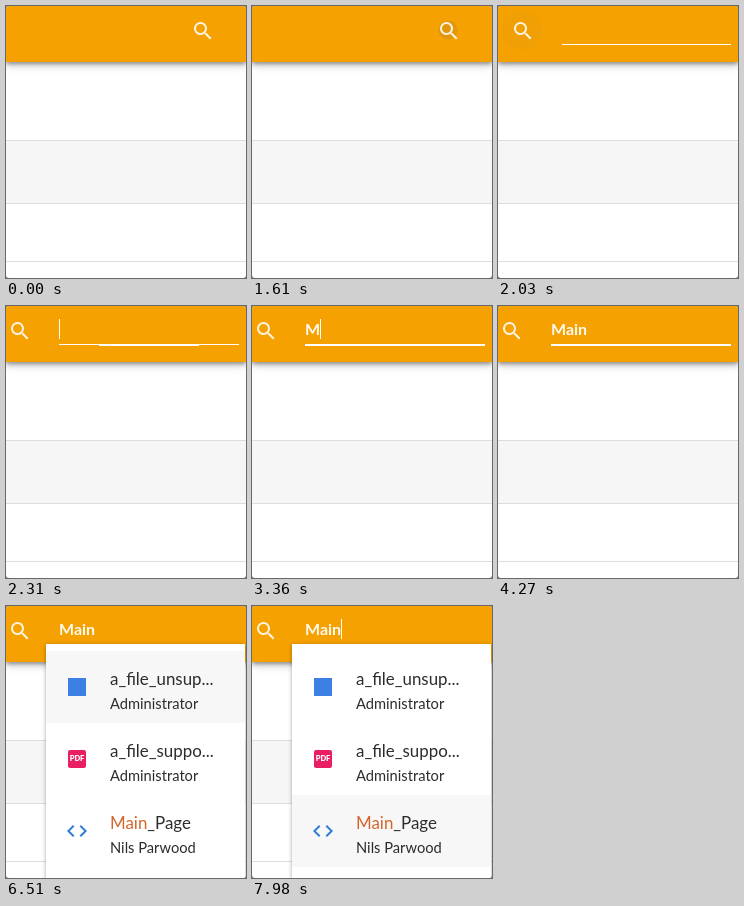
An HTML page for the animation above (8 s loop, 240 px wide and 272 px high).

```html
<!DOCTYPE html>
<html lang="en">
<head>
<meta charset="utf-8">
<title>Search</title>
<style>
html, body { margin: 0; width: 100%; height: 100%; overflow: hidden; background: #777; }
div, svg, b { position: absolute; }
#stage { width: 240px; height: 272px; overflow: hidden; border-radius: 3px; background: #fff; font-family: Lato, sans-serif; }
.line { width: 240px; height: 1px; background: #dedede; }
#band { top: 135px; width: 240px; height: 62px; background: #f6f6f6; }
#bar { width: 240px; height: 56px; background: #f5a102; box-shadow: 0 2px 4px rgba(0,0,0,.35), 0 3px 9px rgba(0,0,0,.2); }
#ripple { top: 4px; width: 40px; height: 40px; border-radius: 50%; background: #4a4a4a; }
#glass { top: 12.5px; fill: #fff; opacity: .87; }
#under { top: 38px; height: 1px; background: #fff; }
#focus { left: 53px; top: 38px; width: 180px; height: 2px; background: #fff; }
#query { left: 53px; top: 13px; color: #fffaf0; font-size: 16px; line-height: 20px; }
#caret { left: 100%; top: 0; width: 1px; height: 20px; background: #fff; }
#menu { left: 40px; top: 38px; width: 199px; height: 250px; background: #fff; box-shadow: 0 1px 4px rgba(0,0,0,.35); }
.item { width: 199px; height: 72px; color: #2c2c2c; white-space: nowrap; }
.title { left: 64px; top: 16px; font-size: 16.9px; line-height: 24px; }
.title span { color: #d4652a; }
.by { left: 64px; top: 43px; font-size: 14.7px; line-height: 18px; }
.square { left: 22px; top: 27px; width: 18px; height: 18px; }
#doc { background: #3d80e3; }
#pdf { border-radius: 2px; background: #e91e63; color: #fff; font: 900 7.5px/18px Lato, sans-serif; text-align: center; }
#code { left: 19px; top: 24px; fill: #2f7bd9; }
</style>
</head>
<body>
<div id="stage">
  <div id="band"></div>
  <div class="line" style="top:134px"></div>
  <div class="line" style="top:197px"></div>
  <div class="line" style="top:255px"></div>
  <div id="bar">
    <div id="ripple"></div>
    <svg id="glass" width="24" height="24"><path d="M15.5 14h-.79l-.28-.27A6.5 6.5 0 1 0 13.73 14.43l.27.28v.79l5 4.99L20.49 19zM9.5 14a4.5 4.5 0 1 1 0-9 4.5 4.5 0 0 1 0 9z"/></svg>
    <div id="under"></div>
    <div id="focus"></div>
    <b id="query"><span id="text"></span><div id="caret"></div></b>
  </div>
  <div id="menu">
    <div class="item" style="top:7px">
      <div class="square" id="doc"></div>
      <div class="title">a_file_unsup...</div><div class="by">Administrator</div>
    </div>
    <div class="item" style="top:79px">
      <div class="square" id="pdf">PDF</div>
      <div class="title">a_file_suppo...</div><div class="by">Administrator</div>
    </div>
    <div class="item" style="top:151px">
      <svg id="code" width="24" height="24"><path d="M9.4 16.6L4.8 12l4.6-4.6L8 6l-6 6 6 6zM14.6 16.6l4.6-4.6-4.6-4.6L16 6l6 6-6 6z"/></svg>
      <div class="title"><span>Main</span>_Page</div><div class="by">Nils Parwood</div>
    </div>
  </div>
</div>
<script>
const LOOP = 8000, STEP = 70;
const $ = id => document.getElementById(id);
const items = document.querySelectorAll('.item');
const clamp = v => Math.max(0, Math.min(1, v));
const ramp = (t, from, length) => clamp((t - from) / length);

// Cubic Bezier easing, solved by bisection
const ease = (x1, y1, x2, y2) => x => {
  const at = (a, b, s) => 3 * a * s * (1 - s) ** 2 + 3 * b * s * s * (1 - s) + s ** 3;
  let lo = 0, hi = 1;
  for (let i = 0; i < 20; i++) {
    const mid = (lo + hi) / 2;
    if (at(x1, x2, mid) < x) lo = mid; else hi = mid;
  }
  return at(y1, y2, hi);
};
const slideEase = ease(.55, 0, .55, .2);
const focusEase = ease(.25, .8, .25, 1);

const keys = [3360, 3500, 3640, 3780];
const blinks = [[2240, 2870], [3360, 4270], [4760, 5250], [5810, 6300], [6860, 7350], [7910, LOOP]];
const hovers = [6510, 6930, 7490];

function draw(t) {
  const away = 183 * (1 - slideEase(ramp(t, 1740, 300)));
  $('glass').style.left = 2 + away + 'px';

  $('ripple').style.left = away - 7 + 'px';
  $('ripple').style.transform = `scale(${t < 1540 ? 0 : .3 + .7 * ramp(t, 1540, 280)})`;
  $('ripple').style.opacity = .12 * (1 - ramp(t, 1890, 180));

  $('under').style.left = 53 + away + 'px';
  $('under').style.width = Math.max(0, 180 - away) + 'px';
  $('focus').style.opacity = t < 2300 ? 0 : 1;
  $('focus').style.transform = `scaleX(${.5 + .5 * focusEase(ramp(t, 2300, 300))})`;

  $('text').textContent = 'Main'.slice(0, keys.filter(k => t >= k).length);
  $('caret').style.opacity = blinks.some(([on, off]) => t >= on && t < off) ? 1 : 0;

  $('menu').style.visibility = t < 4480 ? 'hidden' : 'visible';
  const active = hovers.filter(h => t >= h).length - 1;
  items.forEach((el, i) => el.style.background = i === active ? '#f7f7f7' : '#fff');
}

function tick() {
  const t = performance.now() % LOOP;
  draw(Math.floor(t / STEP) * STEP);
  requestAnimationFrame(tick);
}
tick();
</script>
</body>
</html>
```
